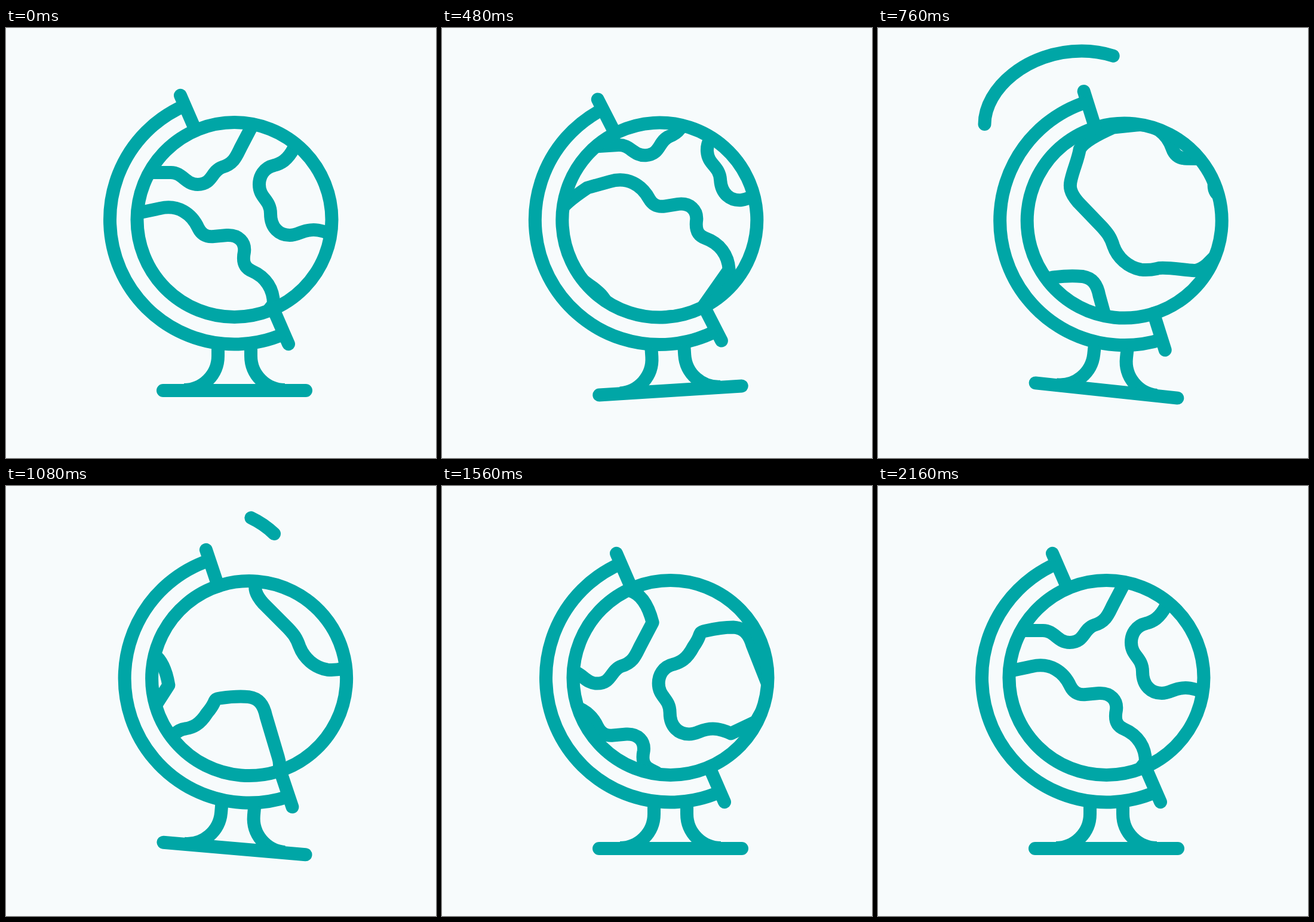
An HTML page that plays this animation: 720x720 px, repeating every 2.4 s.

```html
<!DOCTYPE html>
<html lang="en">
<head>
<meta charset="utf-8">
<title>Spinning globe</title>
<style>
  html, body { margin: 0; width: 100%; height: 100%; overflow: hidden; background: #f7fbfc; }
  svg { display: block; width: 100vw; height: 100vh; }
  .line { fill: none; stroke: #00a6a6; stroke-width: 22; stroke-linecap: round; stroke-linejoin: round; }
</style>
</head>
<body>
<svg viewBox="0 0 720 720" class="line">
  <defs>
    <clipPath id="disc"><circle cx="382.5" cy="321" r="165"/></clipPath>
    <g id="lands">
      <path d="M240 242 H276 C296 242 300 262 321 262 C346 262 343 240 362 233
               C382 227 386 214 393 200 L414 160 Q402 113 374 106 H300 L225 190 Z"/>
      <path d="M482 201 C471 222 460 227 449 230 C431 234 424 249 424 262 C424 285 443 287 443 311
               C443 335 458 347 475 347 C490 347 495 338 515 338 C525 338 538 342 545 346
               L587 326 L610 285 Q612 276 607 264 L581 198 C575 178 566 169 549 168
               C532 168 516 171 503 174 C494 176 494 177 492 183 Q489 191 482 201 Z"/>
      <path d="M220 310 L258 302 C288 295 311 311 322 335 C328 347 337 350 348 349 L370 347
               C390 346 401 359 399 375 C396 390 398 401 412 407 C435 417 448 437 448 462
               L400 522 Q390 532 381 534 C362 535 337 533 322 536 C315 538 308 542 291 542
               C269 540 250 526 241 507 C235 493 229 487 219 478 L175 441
               C159 426 157 416 159 404 C161 386 167 370 168 352 Q175 336 220 310 Z"/>
    </g>
  </defs>

  <g id="globe">
    <g clip-path="url(#disc)">
      <use id="leaving" href="#lands"/>
      <use id="arriving" href="#lands"/>
    </g>
    <circle cx="382.5" cy="321" r="163"/>
    <g transform="translate(382.5 321) rotate(-23.5)">
      <path d="M0 -227 V-163 M0 163 V227"/>
      <path d="M0 -208.5 A208.5 208.5 0 0 0 0 208.5" stroke-linecap="butt"/>
    </g>
    <path d="M355 533 V549 A57 57 0 0 1 298 606 M410 533 V549 A57 57 0 0 0 467 606" stroke-linecap="butt"/>
    <path d="M263 607 H502"/>
  </g>

  <path id="swoosh" d="M178.500 161 C178.500 102 250 38.500 341 38.500 C382 38.500 420 52 449 80"/>
</svg>

<script>
const $ = id => document.getElementById(id);
const LOOP = 2400, STEP = 40;
const DRIFT = { x: 0.667, y: -0.745 };
const swoosh = $('swoosh');
const swooshLength = swoosh.getTotalLength();

// Cubic bezier ease with control points (.33, 0) and (.3, 1).
function ease(x) {
  if (x <= 0) return 0;
  if (x >= 1) return 1;
  let lo = 0, hi = 1, s = 0.5;
  for (let i = 0; i < 24; i++) {
    s = (lo + hi) / 2;
    const r = 1 - s;
    if (0.99 * r * r * s + 0.9 * r * s * s + s ** 3 < x) lo = s; else hi = s;
  }
  return s * s * (3 - 2 * s);
}

const progress = (t, from, to) => ease((t - from) / (to - from));

// Smooth curve through [time, value] keys, at rest at both ends.
function track(keys) {
  const last = keys.length - 1;
  const slope = i => {
    const a = keys[i - 1], b = keys[i + 1];
    return a && b ? (b[1] - a[1]) / (b[0] - a[0]) : 0;
  };
  return t => {
    if (t <= keys[0][0]) return keys[0][1];
    if (t >= keys[last][0]) return keys[last][1];
    const i = keys.findIndex(k => k[0] > t) - 1;
    const [t0, v0] = keys[i], [t1, v1] = keys[i + 1];
    const d = t1 - t0, u = (t - t0) / d, w = 1 - u;
    return v0 * w * w * (1 + 2 * u) + slope(i) * d * u * w * w
         + v1 * u * u * (3 - 2 * u) - slope(i + 1) * d * u * u * w;
  };
}

const leavingShift = track([[120, 0], [320, 18], [480, 68], [760, 191], [1080, 331], [1240, 390], [1600, 540]]);
const arrivingShift = track([[120, -540], [480, -425], [760, -340], [1080, -247], [1240, -195],
                             [1560, -92], [1860, -23], [2160, 0]]);

const tilt = t => -5 * progress(t, 120, 390) + 12 * progress(t, 390, 920) - 7 * progress(t, 920, 1520);

function shift(node, distance) {
  node.setAttribute('transform', `translate(${distance * DRIFT.x} ${distance * DRIFT.y})`);
}

function drawSwoosh(t) {
  const start = progress(t, 834, 1234) * swooshLength;
  const length = progress(t, 480, 980) * swooshLength - start;
  swoosh.style.display = length > 0.5 ? '' : 'none';
  swoosh.setAttribute('stroke-dasharray', `${Math.max(length, 0)} 9999`);
  swoosh.setAttribute('stroke-dashoffset', -start);
}

function draw(time) {
  let t = Math.floor((time % LOOP) / STEP) * STEP;
  if (t === 520) t = 480; // brief hold on the backswing
  if (t < 160) t = 0;
  $('globe').setAttribute('transform', `rotate(${tilt(t)} 382.5 607)`);
  shift($('leaving'), leavingShift(t));
  shift($('arriving'), arrivingShift(t));
  drawSwoosh(t);
}

const began = performance.now();
function tick() {
  draw(performance.now() - began);
  requestAnimationFrame(tick);
}
tick();
</script>
</body>
</html>
```
